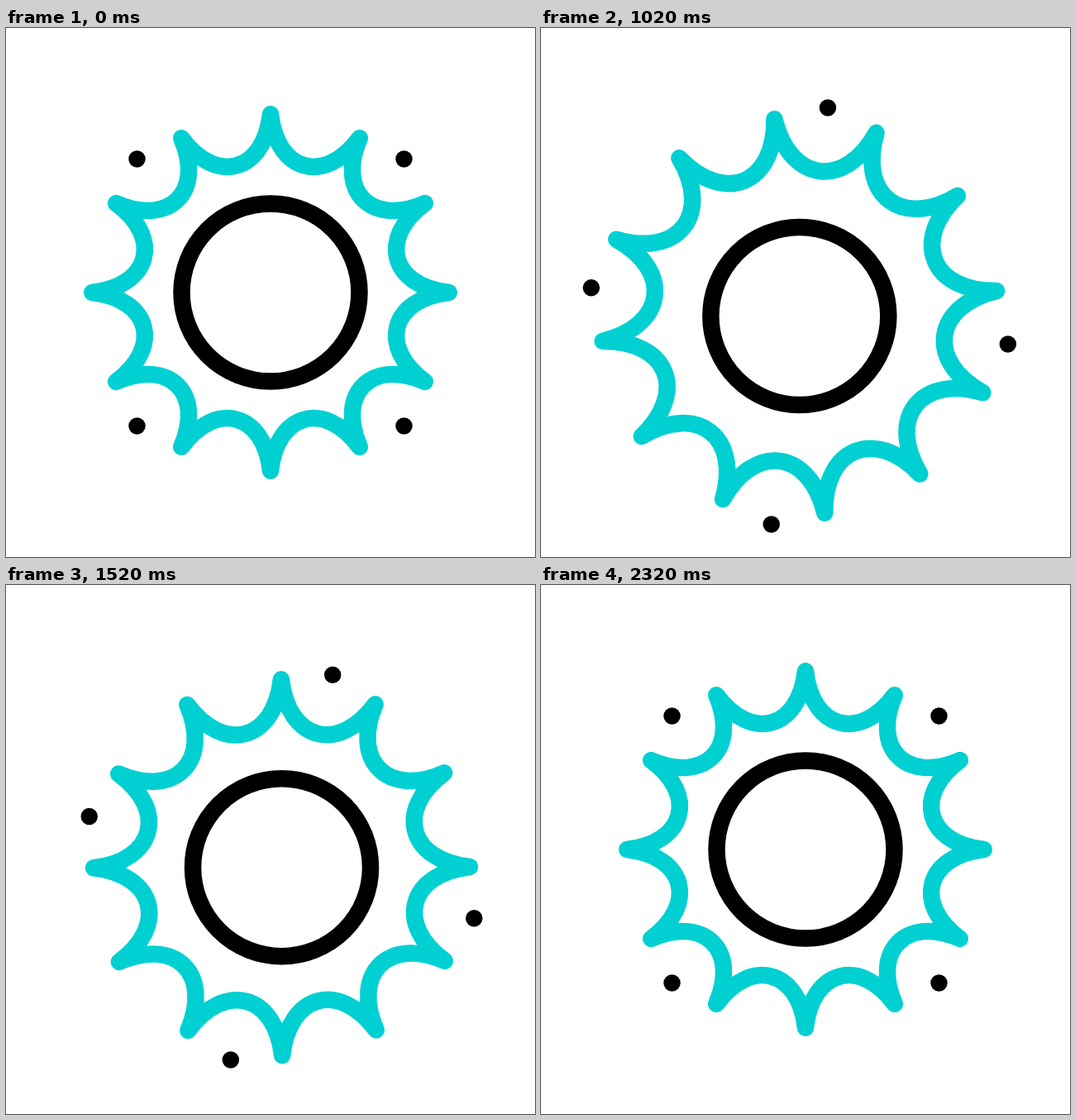
Animation, 640 px wide and 640 px high, one loop 2.4 s. Source, as an HTML page with a canvas:

```html
<!DOCTYPE html>
<html lang="en">
<head>
<meta charset="utf-8">
<title>Turning sun</title>
<style>
  html, body { margin: 0; width: 100%; height: 100%; overflow: hidden; background: #fff; }
  canvas { display: block; width: 640px; height: 640px; }
</style>
</head>
<body>
<canvas id="stage" width="640" height="640"></canvas>
<script>
const ctx = document.getElementById('stage').getContext('2d');
const LOOP = 2400, MOVE = 2320, STEP = 20;
const LINE = 20.5, RING = 107.5, TIP = 215.75, DOT = 228.4;
const RAD = Math.PI / 180;

// Sum of sine waves that is zero at both ends of the move
const waves = (p, ...sizes) =>
  sizes.reduce((sum, size, i) => sum + size * Math.sin((i + 1) * Math.PI * p), 0);

const settle = x => Math.sin(x * Math.PI / 2) ** 1.6;
const grow = x => x ** 1.2;
const steady = x => x;

// Shrink, swell, shrink again, return
function scaleAt(t) {
  const leg = (t0, t1, from, to, ease) => from + (to - from) * ease((t - t0) / (t1 - t0));
  if (t < 520) return leg(0, 520, 1, 0.84, settle);
  if (t < 1215) return leg(520, 1215, 0.84, 1.246, grow);
  if (t < 1890) return leg(1215, 1890, 1.246, 0.822, steady);
  return leg(1890, MOVE, 0.822, 1, settle);
}

function disc(x, y, r) {
  ctx.beginPath();
  ctx.arc(x, y, r, 0, 2 * Math.PI);
}

function draw(time) {
  const p = time / MOVE;
  const cx = 320 + waves(p, -0.5, -12.8, -2, 3, 0, -1.7);
  const cy = 320 + waves(p, 26.1, 1.5, -2.5, -0.15, 0.45, -0.2);
  const turn = 270 * p + waves(p, -56.1, -37.7, 3.7, -7.7, 1.5);
  const scale = scaleAt(time);

  // Point at an angle: "out" along it, "side" across it
  const at = (deg, out, side = 0) => {
    const c = Math.cos((deg + turn) * RAD), s = Math.sin((deg + turn) * RAD);
    return [cx + scale * (out * c - side * s), cy + scale * (out * s + side * c)];
  };

  ctx.fillStyle = '#fff';
  ctx.fillRect(0, 0, 640, 640);
  ctx.lineWidth = LINE;
  ctx.lineJoin = 'round';

  ctx.strokeStyle = '#00d0d2';
  ctx.beginPath();
  ctx.moveTo(...at(0, TIP));
  for (let a = 0; a < 360; a += 30) {
    ctx.bezierCurveTo(...at(a + 15, 142.5, -30), ...at(a + 15, 142.5, 30), ...at(a + 30, TIP));
  }
  ctx.closePath();
  ctx.stroke();

  ctx.strokeStyle = ctx.fillStyle = '#000';
  disc(cx, cy, RING);
  ctx.stroke();
  for (let a = 45; a < 360; a += 90) {
    disc(...at(a, DOT), LINE / 2);
    ctx.fill();
  }
}

const start = performance.now();
function tick() {
  const time = (performance.now() - start) % LOOP;
  draw(Math.min(Math.round(time / STEP) * STEP, MOVE));
  requestAnimationFrame(tick);
}
tick();
</script>
</body>
</html>
```
